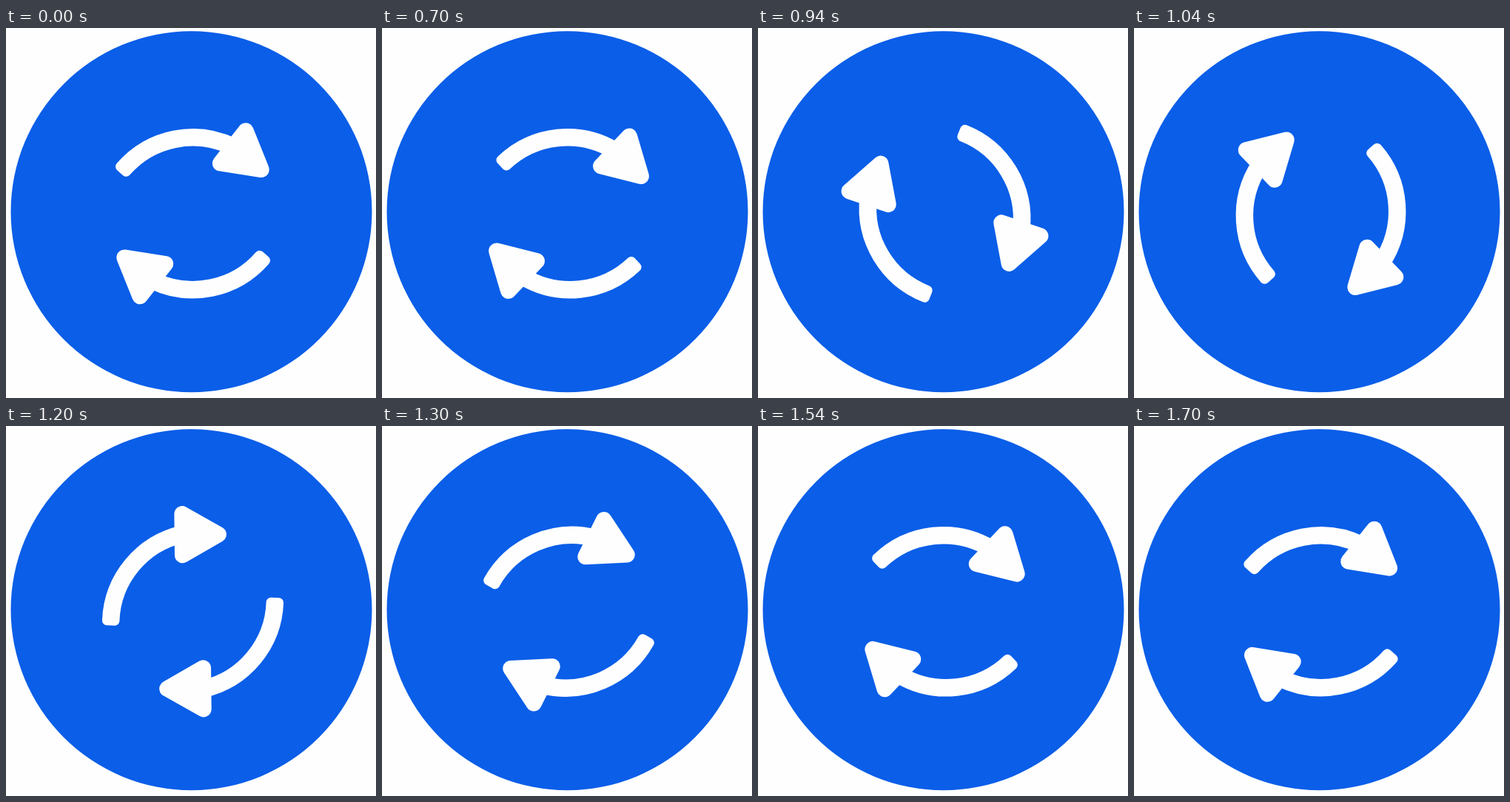
An HTML page for the animation above (1820 ms loop, 500 by 500 pixels).

```html
<!DOCTYPE html>
<html lang="en">
<head>
<meta charset="utf-8">
<title>Refresh arrows</title>
<style>
  html, body { margin: 0; width: 100%; height: 100%; overflow: hidden; background: #fefefe; }
  svg { display: block; width: 100vw; height: 100vh; }
  #arrows { fill: #fefefe; stroke: #fefefe; stroke-linejoin: round; }
</style>
</head>
<body>
<svg viewBox="0 0 500 500">
  <defs>
    <g id="arrow">
      <path stroke-width="13" d="M-98-63.4A129.65 129.65 0 0 1 56.8-95.1L52.2-85.6A119.15 119.15 0 0 0-90.1-56.5Z"/>
      <path stroke-width="21.4" d="M71.5-111.8L37-68L92.5-59.4Z"/>
    </g>
  </defs>
  <circle cx="250.5" cy="248.2" r="244" fill="#0a5ee8"/>
  <g id="arrows">
    <use href="#arrow"/>
    <use href="#arrow" transform="rotate(180)"/>
  </g>
</svg>
<script>
  const LOOP = 1820, STEP = 20;
  const SPIN_START = 680, SPIN_END = 1380, SETTLE_END = 1700;
  const OVERSHOOT = 190, REST = 180.35;
  const arrows = document.getElementById('arrows');

  const progress = (t, from, to) => Math.min(1, Math.max(0, (t - from) / (to - from)));
  const easeInOut = u => u * u * (3 - 2 * u);

  // Steady spin past the half turn, then a soft settle back.
  function angleAt(t) {
    const spin = OVERSHOOT * progress(t, SPIN_START, SPIN_END);
    const settle = easeInOut(progress(t, SPIN_END, SETTLE_END));
    return spin + (REST - OVERSHOOT) * settle;
  }

  function draw(now) {
    const t = Math.floor((now % LOOP) / STEP) * STEP;
    arrows.setAttribute('transform', `translate(252.5 250.75) rotate(${angleAt(t)})`);
  }

  const start = performance.now();
  function tick() {
    draw(performance.now() - start);
    requestAnimationFrame(tick);
  }
  tick();
</script>
</body>
</html>
```
